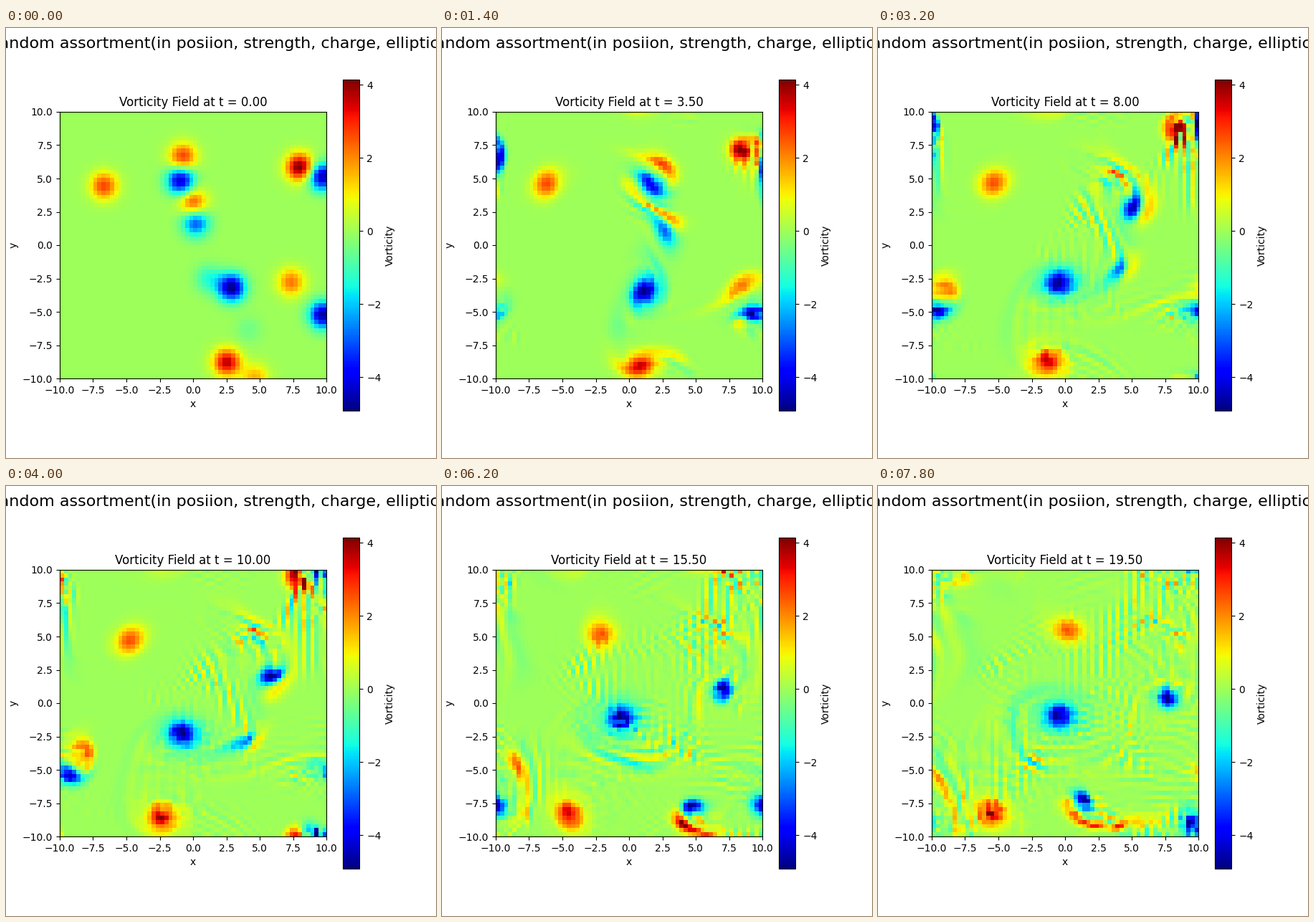
Write a matplotlib script that moves like this. It is 600x600 px and loops after 8000 ms.

```python
import numpy as np
import matplotlib.pyplot as plt
from matplotlib.animation import FuncAnimation

N, L = 64, 20.0
DX = L / N
NU = 0.001
FRAMES, DT, SUBSTEPS = 40, 0.5, 20

# strength and centre of each Gaussian vortex
VORTICES = [
    (2.7, -6.85, 4.25), (2.8, -0.95, 6.43), (-4.4, -1.12, 4.63),
    (2.6, -0.18, 3.03), (-3.1, 0.02, 1.48), (-4.9, 2.70, -3.36),
    (-1.3, 1.00, -2.70), (-0.5, 3.95, -6.50), (3.7, 2.35, -8.95),
    (1.6, 4.45, -10.1), (2.2, 7.15, -2.95), (-4.7, 9.55, -5.40),
    (4.3, 7.80, 5.65), (-4.6, 9.50, 4.95),
]

grid = -L / 2 + DX * np.arange(N)
X, Y = np.meshgrid(grid, grid)
k = 2 * np.pi * np.fft.fftfreq(N, DX)
K2 = k[:, None] ** 2 + k[None, :] ** 2
K2[0, 0] = 1.0


def ddx(f):
    return (np.roll(f, -1, 1) - np.roll(f, 1, 1)) / (2 * DX)


def ddy(f):
    return (np.roll(f, -1, 0) - np.roll(f, 1, 0)) / (2 * DX)


def laplacian(f):
    near = sum(np.roll(f, s, a) for s in (1, -1) for a in (0, 1))
    return (near - 4 * f) / DX**2


def rate(w):
    """Vorticity equation with a spectral stream function."""
    psi = np.fft.ifft2(-np.fft.fft2(w) / K2).real
    return ddy(psi) * ddx(w) - ddx(psi) * ddy(w) + NU * laplacian(w)


def rk4(w, h):
    a = rate(w)
    b = rate(w + h / 2 * a)
    c = rate(w + h / 2 * b)
    d = rate(w + h * c)
    return w + h / 6 * (a + 2 * b + 2 * c + d)


def simulate():
    w = sum(s * np.exp(-(X - x) ** 2 - (Y - y) ** 2) for s, x, y in VORTICES)
    fields = [w]
    for _ in range(FRAMES - 1):
        for _ in range(SUBSTEPS):
            w = rk4(w, DT / SUBSTEPS)
        fields.append(w)
    return fields


fields = simulate()

fig, ax = plt.subplots(figsize=(6, 6), dpi=100)
fig.suptitle("A random assortment(in posiion, strength, charge, ellipticity)",
             fontsize=16)
img = ax.imshow(fields[0], extent=[-10, 10, -10, 10], origin="lower",
                cmap="jet", vmin=-4.912, vmax=4.147)
fig.colorbar(img, ax=ax, label="Vorticity")
ax.set_xlabel("x")
ax.set_ylabel("y")
title = ax.set_title("")


def draw(i):
    img.set_data(fields[i])
    title.set_text(f"Vorticity Field at t = {i * DT:.2f}")
    return img, title


anim = FuncAnimation(fig, draw, frames=FRAMES, interval=200, repeat=True)
plt.show()
```
